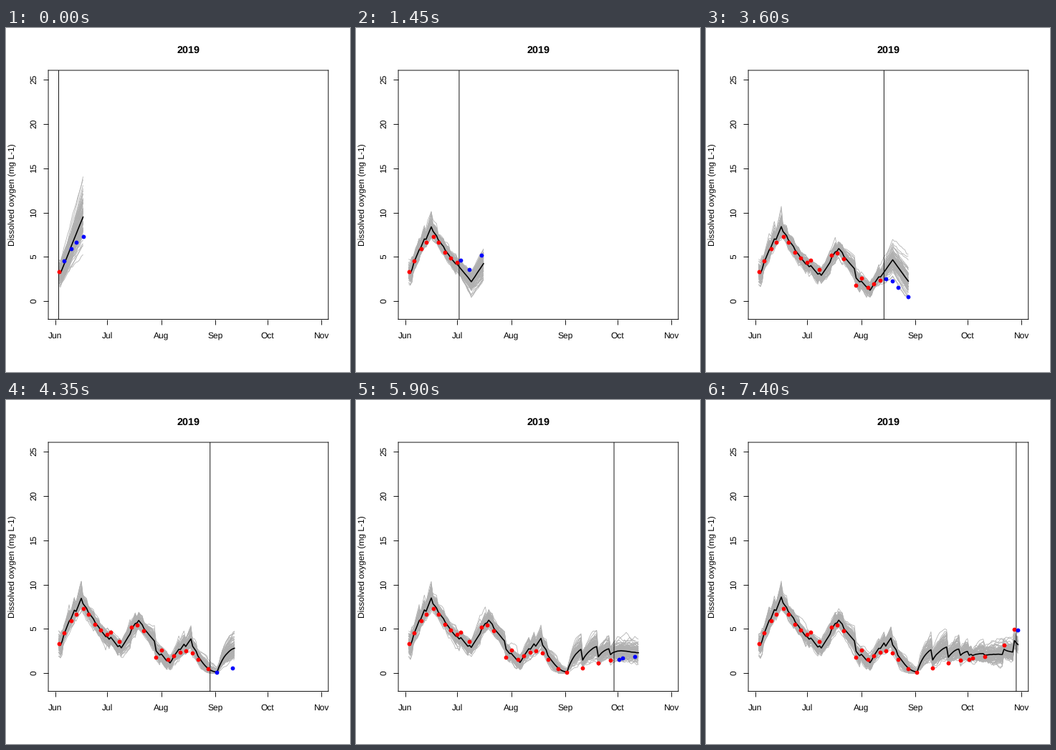
A matplotlib script that plays this animation: 480x480 px, repeating every 7.45 s.

```python
import numpy as np
import matplotlib.pyplot as plt
from matplotlib.animation import FuncAnimation
from matplotlib.collections import LineCollection

plt.rcParams.update({"toolbar": "None", "text.hinting": "none",
                     "font.family": ["Liberation Sans", "DejaVu Sans"]})

SIZE, FRAMES, STEP_MS = 480, 149, 50
FIRST, LAST, HORIZON = 2, 151, 14  # days counted from 1 June
MEMBERS = 100

# Observations, day: mg/L
OBS = {2: 3.35, 5: 4.57, 9: 5.95, 12: 6.62, 16: 7.3, 19: 6.66, 23: 5.55,
       26: 4.85, 30: 4.36, 32: 4.65, 37: 3.55, 44: 5.17, 47: 5.45, 51: 4.77,
       58: 1.78, 61: 2.6, 65: 1.6, 68: 2.0, 72: 2.4, 75: 2.52, 79: 2.28,
       82: 1.57, 88: 0.48, 93: 0.12, 102: 0.57, 111: 1.15, 118: 1.45,
       123: 1.58, 125: 1.7, 132: 1.87, 143: 3.2, 149: 4.92, 151: 4.88}
OBS_VAR = 0.3

# Model: daily drift from each start day, then relaxation towards a level
DRIFT = {2: -.2, 3: .49, 16: -.25, 38: .3, 48: -.23, 66: .29, 79: -.27}
RELAX_FROM, RATE = 93, 0.17


def noise(rng):
    return np.clip(rng.standard_normal(MEMBERS), -2.2, 2.2)


def step(rng, x, day, up, down, level):
    """Carry all members from one day to the next."""
    if day < RELAX_FROM:
        drift = DRIFT[max(d for d in DRIFT if d <= day)]
        move = drift * up if drift > 0 else drift * down * np.minimum(x, 1)
        sd = 0.12 * np.minimum(x + 0.1, 1)
    else:
        target = 2.15 + 1.25 / (1 + np.exp((day - 120) / 4))
        move = RATE * (target * level - x)
        sd = 0.16
    return np.maximum(x + move + sd * noise(rng), 0)


def assimilate(rng, x, obs):
    """Ensemble Kalman update with perturbed observations."""
    gain = x.var() / (x.var() + OBS_VAR)
    kick = np.sqrt(OBS_VAR) * noise(rng)
    return np.maximum(x + gain * (obs + kick - kick.mean() - x), 0)


def ensemble(now):
    rng = np.random.default_rng(2019 + now)
    up, down, level = (np.exp(sd * noise(rng) - sd * sd / 2)
                       for sd in (.22, .15, .23))
    start = noise(rng)
    x = OBS[FIRST] + 0.65 * (start - start.mean())
    days = np.arange(FIRST, min(now + HORIZON, LAST) + 1)
    runs = [x]
    for day in days[1:]:
        x = step(rng, x, day - 1, up, down, level)
        if day in OBS and day <= now:
            x = assimilate(rng, x, OBS[day])
        runs.append(x)
    return days, np.array(runs)


fig = plt.figure(figsize=(SIZE / 72, SIZE / 72), dpi=72, facecolor="white")
LEFT, RIGHT, TOP, BOTTOM = 59.04, 449.76, 59.04, 406.56
X0, X1, Y0, Y1 = -3.96, 156.96, -2.04, 26.04
ax = fig.add_axes([LEFT / SIZE, 1 - BOTTOM / SIZE,
                   (RIGHT - LEFT) / SIZE, (BOTTOM - TOP) / SIZE])
ax.set(xlim=(X0, X1), ylim=(Y0, Y1))

MONTHS = dict(Jun=0, Jul=30, Aug=61, Sep=92, Oct=122, Nov=153)
LEVELS = range(0, 26, 5)
ax.set_xticks(list(MONTHS.values()))
ax.set_yticks(LEVELS)
ax.tick_params(length=7.2, width=0.9, labelbottom=False, labelleft=False)
for spine in ax.spines.values():
    spine.set(linewidth=0.9, zorder=8, snap=False)
for tick in ax.get_xticklines() + ax.get_yticklines():
    tick.set_snap(False)


def label(x, y, text, size=12, angle=0, **kw):
    fig.text(x / SIZE, 1 - y / SIZE, text, size=size, rotation=angle, ha="center",
             va="baseline", rotation_mode="anchor", **kw)


for name, day in MONTHS.items():
    label(LEFT + (day - X0) * (RIGHT - LEFT) / (X1 - X0), 433, name)
for v in LEVELS:
    label(42, BOTTOM - (v - Y0) * (BOTTOM - TOP) / (Y1 - Y0) - 0.5, str(v), angle=90)
label(13, 233, "Dissolved oxygen (mg L-1)", angle=90)
label(254.4, 35, "2019", size=14.4, weight="bold")

members = LineCollection([], colors="#b0b0b0", linewidths=0.8, zorder=2)
ax.add_collection(members)
mean_line, = ax.plot([], [], color="black", lw=1.6, zorder=3)
now_line = ax.axvline(FIRST, color="black", lw=0.9, zorder=4, snap=False)
dots = dict(ls="", marker="o", ms=5.8, mew=0, zorder=5, snap=False)
seen, = ax.plot([], [], color="#ff0000", **dots)
ahead, = ax.plot([], [], color="#0000ff", **dots)


def show_obs(dot, after, until):
    days = [d for d in OBS if after < d <= until]
    dot.set_data(days, [OBS[d] for d in days])


def draw(i):
    now = FIRST + i
    days, runs = ensemble(now)
    members.set_segments([np.column_stack([days, run]) for run in runs.T])
    mean_line.set_data(days, runs.mean(axis=1))
    now_line.set_xdata([now, now])
    show_obs(seen, 0, now)
    show_obs(ahead, now, now + HORIZON)
    return members, mean_line, now_line, seen, ahead


anim = FuncAnimation(fig, draw, frames=FRAMES, interval=STEP_MS, repeat=True,
                     repeat_delay=0, blit=False)
plt.show()
```
